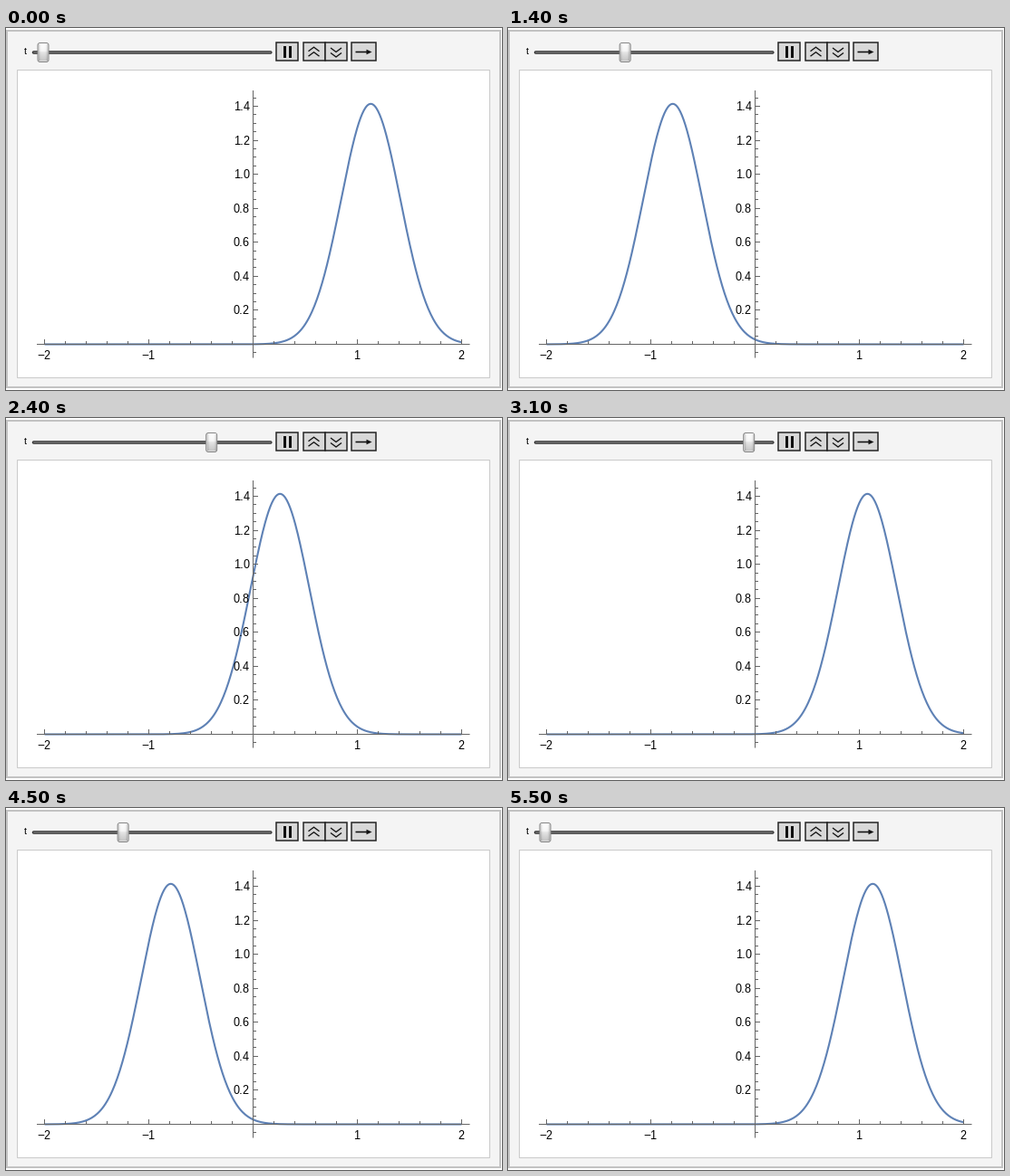
These frames come from a looping animation (547x400 px, 6000 ms). A matplotlib script:

```python
import numpy as np
import matplotlib.pyplot as plt
from matplotlib.animation import FuncAnimation
from matplotlib.patches import FancyBboxPatch, Polygon, Rectangle

W, H, DPI = 547, 400, 64
PX = 72 / DPI  # points per pixel

X0, Y0 = 272.5, 349.5  # plot origin on the stage
UX, UY = 115, 187.86   # pixels per unit

BLUE, AXIS, INK = "#5e81b5", "#666666", "#111111"
FRAMES, INTERVAL = 60, 100

plt.rcParams.update({"font.family": "Liberation Sans",
                     "text.hinting": "native", "text.hinting_factor": 1,
                     "path.snap": False})
fig = plt.figure(figsize=(W / DPI, H / DPI), dpi=DPI, facecolor="white")
ax = fig.add_axes([0, 0, 1, 1])
ax.set_axis_off()


def box(x, y, x2, y2, face, edge, lw):
    ax.add_patch(Rectangle((x, y), x2 - x, y2 - y, fc=face, ec=edge, lw=lw * PX,
                           joinstyle="miter", snap=False, zorder=1))


def line(xs, ys, color, lw, z=2, cap="butt"):
    return ax.plot(xs, ys, color=color, lw=lw * PX, zorder=z, snap=False,
                   solid_capstyle=cap, solid_joinstyle="miter")[0]


def label(x, y, text, ha, size=13.33):
    ax.text(x, y, text, ha=ha, va="baseline", fontsize=size * PX,
            color="black", zorder=5)


def pixel(v):
    """Centre of the pixel that holds v."""
    return np.floor(v) + 0.5


def draw_panel():
    box(1, 3, 545, 397, "#f4f4f4", "#c2c2c2", 2)
    box(12.5, 46.5, 533.5, 386.5, "white", "#cacaca", 1)


def draw_controls():
    label(19.5, 29, "t", "left", 11)
    line([30.5, 291.8], [27, 27], "#333333", 3.6, 2, "round")
    line([30.5, 291.8], [27, 27], "#808080", 1.2, 3, "round")
    for x, x2 in ((298, 322), (328, 352), (352, 376), (381, 408)):
        box(x, 16, x2, 36, "#d8d8d8", "#222222", 1.5)
    for x in (306, 312):
        box(x, 20, x + 3, 33, INK, "none", 0)
    for dy in (0, 5.5):
        line([333.5, 339.5, 345.5], [25.7 + dy, 21.2 + dy, 25.7 + dy], INK, 1.3)
        line([358, 364, 370], [22 + dy, 26.5 + dy, 22 + dy], INK, 1.3)
    line([385.5, 399], [26.5, 26.5], INK, 1.6)
    ax.add_patch(Polygon([(397.5, 23.7), (403.5, 26.5), (397.5, 29.3)],
                         fc=INK, ec="none", zorder=3))


def draw_axes():
    line([34, 511.5], [Y0, Y0], AXIS, 1, 4)
    line([X0, X0], [69, 364.5], AXIS, 1, 4)
    for k in range(-10, 11):
        x = X0 + k / 5 * UX
        major = k % 5 == 0
        line([pixel(x)] * 2, [Y0, Y0 - (5.5 if major else 3.5)], AXIS, 1, 4)
        if major and k:
            label(x - 0.5, 366, f"{k // 5}".replace("-", "\u2212"), "center")
    for k in range(-1, 30):
        y = Y0 - k / 20 * UY
        major = k % 4 == 0
        line([X0, X0 + (5.5 if major else 3.5)], [pixel(y)] * 2, AXIS, 1, 4)
        if major and k:
            label(269, y + 4.5, f"{k / 20:.1f}", "right")


draw_panel()
draw_controls()
draw_axes()

xs = np.linspace(-2, 2, 500)
curve = line(X0 + UX * xs, np.full_like(xs, Y0), BLUE, 2.1, 3)

# Slider thumb: rounded body, brightest near the top, darker at the sides
thumb = FancyBboxPatch((35, 16.5), 12, 21, fc="#dadada", ec="#858585",
                       boxstyle="round,pad=0,rounding_size=2.6",
                       lw=PX, snap=False, zorder=5)
ax.add_patch(thumb)
down = np.interp(np.linspace(0, 1, 20), [0, 0.4, 0.6, 1],
                 [0.99, 0.96, 0.88, 0.78])
across = 1 - 0.14 * np.linspace(-1, 1, 10) ** 4
gloss = ax.imshow(np.outer(down, across), cmap="gray", vmin=0, vmax=1,
                  aspect="auto", interpolation="nearest", zorder=6)
ax.set_xlim(0, W)
ax.set_ylim(H, 0)


def phase(i):
    """Turn of the oscillation: rest, run forward, run back, rest."""
    n = max(0, min(i - 4, 25, 55 - i))
    return (0.5 + 14.88 * (n - 1)) / 360 if n else 0


def update(i):
    t = phase(i)
    centre = 2 / np.sqrt(np.pi) * np.cos(2 * np.pi * t)
    density = np.sqrt(2) * np.exp(-2 * np.pi * (xs - centre) ** 2)
    curve.set_ydata(Y0 - UY * density)
    x = 41 + 236 * t
    thumb.set_x(x - 6)
    gloss.set_extent((x - 5, x + 5, 36.5, 17.5))
    return curve, thumb, gloss


anim = FuncAnimation(fig, update, frames=FRAMES, interval=INTERVAL,
                     repeat=True, repeat_delay=0, blit=False)
plt.show()
```
